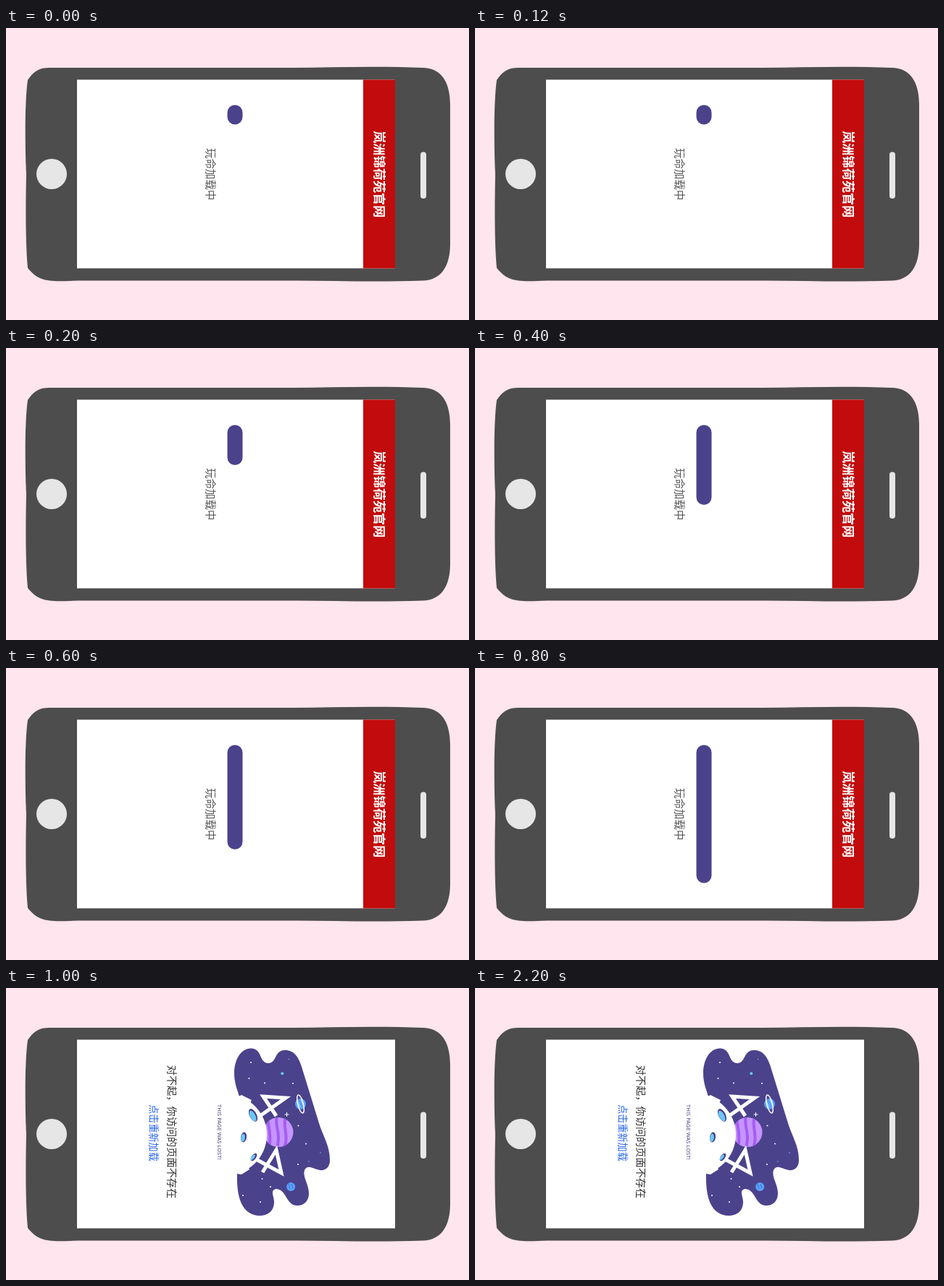
An HTML page that plays this animation: 639x404 px, repeating every 3000 ms.

```html
<!DOCTYPE html>
<html lang="zh">
<head>
<meta charset="utf-8">
<title>Loading</title>
<style>
  html, body { margin: 0; width: 100%; height: 100%; overflow: hidden; background: #ffe5ee; }
  svg { display: block; width: 639px; height: 404px; }
  text { font-family: "Noto Sans CJK SC", "Noto Sans CJK", sans-serif; font-weight: 300; text-anchor: middle; }
  .title { font-size: 17.2px; font-weight: 700; fill: #fff; }
  .latin { font: 7.6px "Open Sans", "Noto Sans", sans-serif; fill: #40377f; }
</style>
</head>
<body>
<svg viewBox="0 0 639 404">
  <defs>
    <clipPath id="globe"><circle cx="376" cy="199.500" r="20.500"/></clipPath>
  </defs>
  <rect width="639" height="404" fill="#ffe5ee"/>

  <!-- phone -->
  <path fill="#4d4d4d" d="M30 72C39 59 46 55 60 55H395C460 54 520 52.500 575 55C600 55 613 74 613 106V299C613 329 601 349 575 349.500C520 351.500 460 350 400 349.500H100C60 351 46 352 30 332C27 300 27 250 28 202C26 160 26 100 30 72Z"/>
  <circle cx="63" cy="202" r="21" fill="#e6e6e6"/>
  <rect x="572" y="171.500" width="8" height="64.500" rx="4" fill="#e6e6e6"/>
  <rect x="98" y="71.500" width="439" height="261" fill="#fff"/>

  <g id="loading">
    <rect x="493" y="71.500" width="44" height="261" fill="#c20b0c"/>
    <text class="title" transform="translate(508.800 202.300) rotate(90)">岚洲锦荷苑官网</text>
    <text transform="translate(277.200 202.300) rotate(90)" font-size="14.400" fill="#555">玩命加载中</text>
    <rect id="bar" x="305.500" y="106.500" width="21" rx="10.500" fill="#4b428c"/>
  </g>

  <g id="lost">
    <path fill="#4b428c" d="M322 150C319 140 315 131 315 118C315 98 325 83.500 338 83.500C354 83.500 349 104 362 104C374 104 370 86 385 86C398 86 404 96 408 109L432 187C437 204 447 218 447 238C447 249 440 253 433 252C422 249 416 244 412 252C409 262 418 271 418 284C418 295 411 301 402 301C386 301 388 279 373 278C363 280 371 289 370 298C369 310 360 315 350 315C326 314 318 291 319 257Z"/>
    <g id="stars"></g>

    <g clip-path="url(#globe)">
      <rect x="355" y="178" width="42" height="43" fill="#c594ff"/>
      <path fill="none" stroke="#a65cf0" stroke-width="4" d="M362 177C359 190 368 195 363 222M374 177C370 191 380 198 374 222M386 177C381 193 391 202 384 222"/>
    </g>

    <!-- moon and its rim -->
    <g fill="#fff">
      <circle cx="304" cy="203" r="56"/>
      <path d="M321 150L325 148L339 155L336 162L341 166L333 172ZM319 257L325 258L336 251L334 247L342 242L330 238Z"/>
    </g>
    <g id="craters"></g>

    <g fill="none" stroke="#fff" stroke-width="5" stroke-linejoin="miter">
      <path d="M352 176L386 152L355 150L373 177"/>
      <path d="M347 238L380 256L373 224L354 255"/>
    </g>

    <circle cx="406.500" cy="160.500" r="7.500" fill="#5aa2fa"/>
    <path fill="none" stroke="#a9d2ff" stroke-width="1.300" d="M402 156L406 165M407 154L411 163"/>
    <ellipse cx="406.500" cy="160.500" rx="3.800" ry="12.800" transform="rotate(-14 406.500 160.500)" fill="none" stroke="#fff" stroke-width="1.500"/>
    <circle cx="393.200" cy="275" r="6" fill="#5aa2fa"/>
    <path fill="none" stroke="#3d7ee0" stroke-width="1.300" d="M390 271L392 278M394 271L396 277"/>

    <text class="latin" transform="translate(292 199.300) rotate(90)">THIS PAGE WAS LOST!</text>
    <text transform="translate(224 199) rotate(90)" font-size="14.200" fill="#333">对不起，你访问的页面不存在</text>
    <text transform="translate(199.300 200.500) rotate(90)" font-size="13.100" fill="#2563f0" style="font-weight:400">点击重新加载</text>
  </g>
</svg>

<script>
const byId = id => document.getElementById(id);

function add(parent, tag, attrs) {
  const node = document.createElementNS("http://www.w3.org/2000/svg", tag);
  for (const key in attrs) node.setAttribute(key, attrs[key]);
  byId(parent).append(node);
}

const dots = (points, r, fill) =>
  points.forEach(([cx, cy]) => add("stars", "circle", { cx, cy, r, fill }));

dots([[338, 103], [335.5, 125], [357, 131.5], [396, 132], [403.5, 190.5], [414, 215.5],
      [403, 244], [353.5, 264], [365, 275], [327, 287], [351, 296]], 1, "#fff");
dots([[390.5, 98.5], [418, 240], [434, 228]], 0.8, "#64c8f5");
dots([[381.3, 118.3]], 2, "#64c8f5");
add("stars", "path", { d: "M384.500 175H390.500M387.500 172V178", stroke: "#fff", "stroke-width": 1 });

for (const [x, y, rx, ry, angle] of [[341, 176, 4.8, 9.5, -27], [328, 206.5, 4, 7, 8], [342, 234, 3, 6, 35]]) {
  const transform = `translate(${x} ${y}) rotate(${angle})`;
  add("craters", "ellipse", { rx, ry, transform, fill: "#40377f" });
  add("craters", "ellipse", { cx: -0.8, cy: 0.8, rx: rx - 1.1, ry: ry - 1.4, transform, fill: "#6cc5f2" });
}

const LOOP = 3000, STEP = 200;
const barHeights = [27, 55.5, 110.5, 144.5, 191];

function draw(time) {
  const step = Math.floor((time % LOOP) / STEP);
  const isLoading = step < barHeights.length;
  byId("loading").style.display = isLoading ? "" : "none";
  byId("lost").style.display = isLoading ? "none" : "";
  if (isLoading) byId("bar").setAttribute("height", barHeights[step]);
}

let start;
function tick(now) {
  start ??= now;
  draw(now - start);
  requestAnimationFrame(tick);
}
draw(0);
requestAnimationFrame(tick);
</script>
</body>
</html>
```
